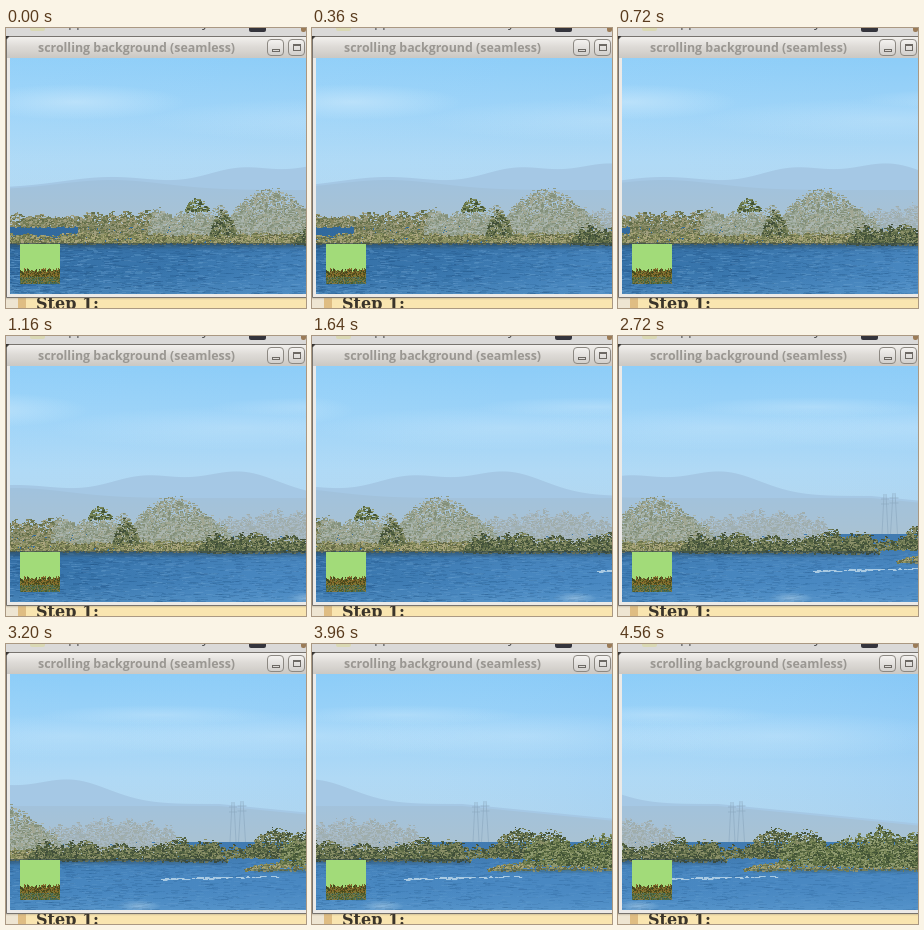
Write an HTML page with a canvas that moves like this. It is 300x280 px and loops after 4660 ms.

```html
<!DOCTYPE html>
<html lang="en">
<head>
<meta charset="utf-8">
<style>
html, body { margin: 0; width: 100%; height: 100%; overflow: hidden; background: #dad9d8; }
div, span, canvas { position: absolute; box-sizing: border-box; }
#stage { width: 300px; height: 280px; overflow: hidden; }
#panel { left: 54px; top: -13px; font: 13px/15px "Open Sans", sans-serif; word-spacing: 8px; color: #444; white-space: pre; }
.icon { top: 0; height: 4px; border-radius: 0 0 2px 2px; }
#page { top: 266px; width: 300px; height: 14px;
  background: linear-gradient(#8a816e, #0000 6px), linear-gradient(90deg, #eee5d2 12px, #dfbd83 12px 20px, #f9e5b0 20px); }
#page span { left: 30px; top: 0; font: bold 16px/19px "DejaVu Serif", serif; color: #3a342a; white-space: pre; }
#corner { top: 8px; width: 8px; height: 8px; background: #33312f; }
#frame { top: 8px; width: 304px; height: 262px; background: #eceae7; border: 1px solid #77736e; border-radius: 5px 0 0 0; }
#title { top: 9px; left: 1px; width: 299px; height: 21px; border-radius: 4px 0 0 0;
  background: linear-gradient(#f2f0ed, #dedbd7 45%, #cbc8c3); }
#title span { left: 31px; top: 1px; font: bold 12.4px/19px "Open Sans", sans-serif; color: #9a9792; white-space: pre; }
.button { top: 2px; width: 17px; height: 17px; border: 1px solid #8c8882; border-radius: 4px; background: linear-gradient(#f4f2f0, #d2cfcb); }
.button div { left: 4px; width: 8px; border: 1px solid #6d6964; }
#view { left: 4px; top: 30px; width: 296px; height: 236px; overflow: hidden; }
#scene { left: -4px; top: -30px; }
#tile { left: 10px; top: 186px; }
</style>
</head>
<body>
<div id="stage">
  <span id="panel">Applications Places System</span>
  <div class="icon" style="left:24px;width:15px;height:3px;background:#d9d8b4"></div>
  <div class="icon" style="left:243px;width:17px;background:#34343c"></div>
  <div class="icon" style="left:295px;width:5px;background:#9b7c58"></div>
  <div id="page"><span>Step 1:</span></div>
  <div id="corner"></div>
  <div id="frame"></div>
  <div id="title">
    <span>scrolling background (seamless)</span>
    <div class="button" style="left:260px"><div style="top:9px;height:3px"></div></div>
    <div class="button" style="left:281px"><div style="top:4px;height:7px;border-top-width:2px"></div></div>
  </div>
  <div id="view">
    <canvas id="scene" width="684" height="280"></canvas>
    <canvas id="tile" width="40" height="40"></canvas>
  </div>
</div>
<script>
const WIDTH = 684;
const scene = document.getElementById('scene');
const c = scene.getContext('2d');
let seed = 11;
const rand = (a = 0, b = 1) => {
  seed = (seed * 16807) % 2147483647;
  return a + (b - a) * seed / 2147483647;
};
const pick = list => list[Math.floor(rand(0, list.length))];
const bump = (x, center, width) => Math.exp(-(((x - center) / width) ** 2));

const haze = ['#a9bac4', '#a5b6c0', '#9fb0b5', '#a0adab'];
const pale = ['#a9b4ad', '#9aa799', '#8f9c89', '#84907a', '#a2a793'];
const olive = ['#a19f7f', '#8b9070', '#85865f', '#737d56', '#626d4a'];
const dark = ['#8a8f68', '#737d56', '#5f6c48', '#4f5f40', '#414f3a'];
const green = ['#8f9a6f', '#7a8758', '#66764a', '#54663f', '#435437'];
const grass = ['#aaa57c', '#949668', '#848a5b', '#737c50', '#656a48'];

function gradient(x0, y0, x1, y1, ...colors) {
  const g = c.createLinearGradient(x0, y0, x1, y1);
  colors.forEach((color, i) => g.addColorStop(i / (colors.length - 1), color));
  return g;
}

function rect(fill, x, y, w, h) {
  c.fillStyle = fill;
  c.fillRect(x, y, w, h);
}

function cloud(x, y, w, h, alpha) {
  c.save();
  c.translate(x, y);
  c.scale(w, h);
  const g = c.createRadialGradient(0, 0, 0, 0, 0, 1);
  g.addColorStop(0, `rgba(215,238,252,${alpha})`);
  g.addColorStop(1, 'rgba(215,238,252,0)');
  rect(g, -1, -1, 2, 2);
  c.restore();
}

function sky() {
  rect(gradient(0, 31, 0, 185, '#8dcdf8', '#9dd3f8', '#b0d9f5', '#b4d7ee'), 0, 0, WIDTH, 220);
  rect(gradient(0, 0, WIDTH, 0, '#b0e0fc30', '#b0e0fc00', '#70b4f030'), 0, 0, WIDTH, 220);
  cloud(70, 74, 110, 18, .5);
  cloud(420, 71, 120, 10, .35);
  cloud(330, 92, 190, 22, .3);
  cloud(540, 92, 190, 24, .35);
}

function hills() {
  const fall = x => 20 * Math.max(0, (x - 480) / 204);
  const far = x => 160 + fall(x) - 11 * bump(x, 105, 70) - 19 * bump(x, 235, 50) - 24 * bump(x, 330, 55);
  const near = x => 162 + fall(x) - 10 * bump(x, 105, 75);
  for (let x = 0; x < WIDTH; x++) {
    rect('#a5c8e5', x, far(x), 1, 50);
    rect(gradient(0, 150, 0, 200, '#a0c2de', '#a9c2d3'), x, near(x), 1, 50);
  }
}

function pylon(x, top, half) {
  c.strokeStyle = '#8fabc2';
  c.lineWidth = .7;
  c.beginPath();
  for (const side of [-1, 1]) {
    c.moveTo(x + side * half, 198);
    c.lineTo(x + side, top);
  }
  for (const y of [top + 5, top + 10]) {
    c.moveTo(x - half - 1, y);
    c.lineTo(x + half + 1, y);
  }
  c.stroke();
}

function water() {
  rect(gradient(0, 0, WIDTH, 0, '#346fa5', '#3875ac', '#4786bf', '#4988c2', '#4988c2'), 0, 198, WIDTH, 82);
  rect(gradient(0, 214, 0, 268, '#28558040', '#5090cc00', '#78b4e050'), 0, 198, WIDTH, 82);
  for (let n = 0; n < 3200; n++) {
    const x = WIDTH * rand() ** 1.4;
    const tone = pick(['33,83,132', '43,100,152', '105,160,207']);
    rect(`rgba(${tone},${.36 - x / 2600})`, Math.round(x), Math.round(rand(217, 267)), rand(2, 9), 1);
  }
  cloud(400, 262, 22, 6, .4);
  for (let n = 0; n < 60; n++) {
    const x = rand(420, 538);
    rect('#a9cae3', Math.round(x), Math.round(235 - (x - 420) / 40 + rand(-1, 1)), rand(2, 6), 1);
  }
}

// A loose dome of leaves standing on the base line.
function bush(x, w, h, base, palette) {
  for (let n = w * h * .5; n > 0; n--) {
    const u = rand(-1, 1);
    const y = base - h * Math.sqrt(1 - u * u) * rand() * rand(.85, 1.05);
    rect(pick(palette), Math.round(x + u * w / 2), Math.round(y) - 1, pick([1, 2, 3]), pick([1, 1, 2]));
  }
}

function grove(from, to, base, h, palette) {
  for (let x = from; x < to; x += rand(5, 11)) bush(x, rand(14, 28), h * rand(.7, 1.05), base, palette);
}

function farShore() {
  grove(235, 435, 212, 38, haze);
  grove(10, 75, 199, 13, olive);
  grove(80, 150, 209, 28, olive);
  grove(150, 310, 211, 32, pale);
  bush(262, 85, 50, 212, pale);
  bush(190, 22, 13, 184, green);
  grove(0, 310, 216, 11, grass);
  bush(216, 24, 26, 209, dark);
  grove(300, 480, 217, 20, dark);
  bush(440, 34, 25, 218, dark);
  bush(474, 28, 20, 218, dark);
  rect(gradient(0, 215, 0, 222, '#2c424ba0', '#2c424b00'), 0, 215, 488, 7);
}

function nearShore() {
  grove(495, WIDTH, 214, 14, dark);
  bush(537, 55, 28, 213, dark);
  bush(567, 40, 27, 213, dark);
  bush(625, 240, 12, 227, grass);
  grove(552, 612, 221, 27, green);
  grove(610, WIDTH, 223, 40, green);
  rect(gradient(0, 225, 0, 230, '#3b565080', '#3b565000'), 515, 225, WIDTH, 5);
}

function tile() {
  const t = document.getElementById('tile').getContext('2d');
  t.fillStyle = '#a2db79';
  t.fillRect(0, 0, 40, 40);
  for (let x = 0; x < 40; x++) {
    for (let y = Math.floor(rand(24, 29)); y < 40; y++) {
      t.fillStyle = pick(y < 33
        ? ['#4e4c1d', '#6c5a22', '#7d7a35', '#3f4a20', '#8a6a2c']
        : ['#537044', '#6f7438', '#43685c', '#807645', '#4d5a2c']);
      t.fillRect(x, y, 1, 1);
    }
  }
}

sky();
hills();
pylon(494, 158, 3);
pylon(503, 157, 3.5);
water();
farShore();
nearShore();
tile();

function play(now) {
  const step = Math.min(114, Math.floor(now % 4660 / 40));
  scene.style.transform = `translateX(${-Math.round(step * 10 / 3)}px)`;
  requestAnimationFrame(play);
}
play(performance.now());
</script>
</body>
</html>
```
